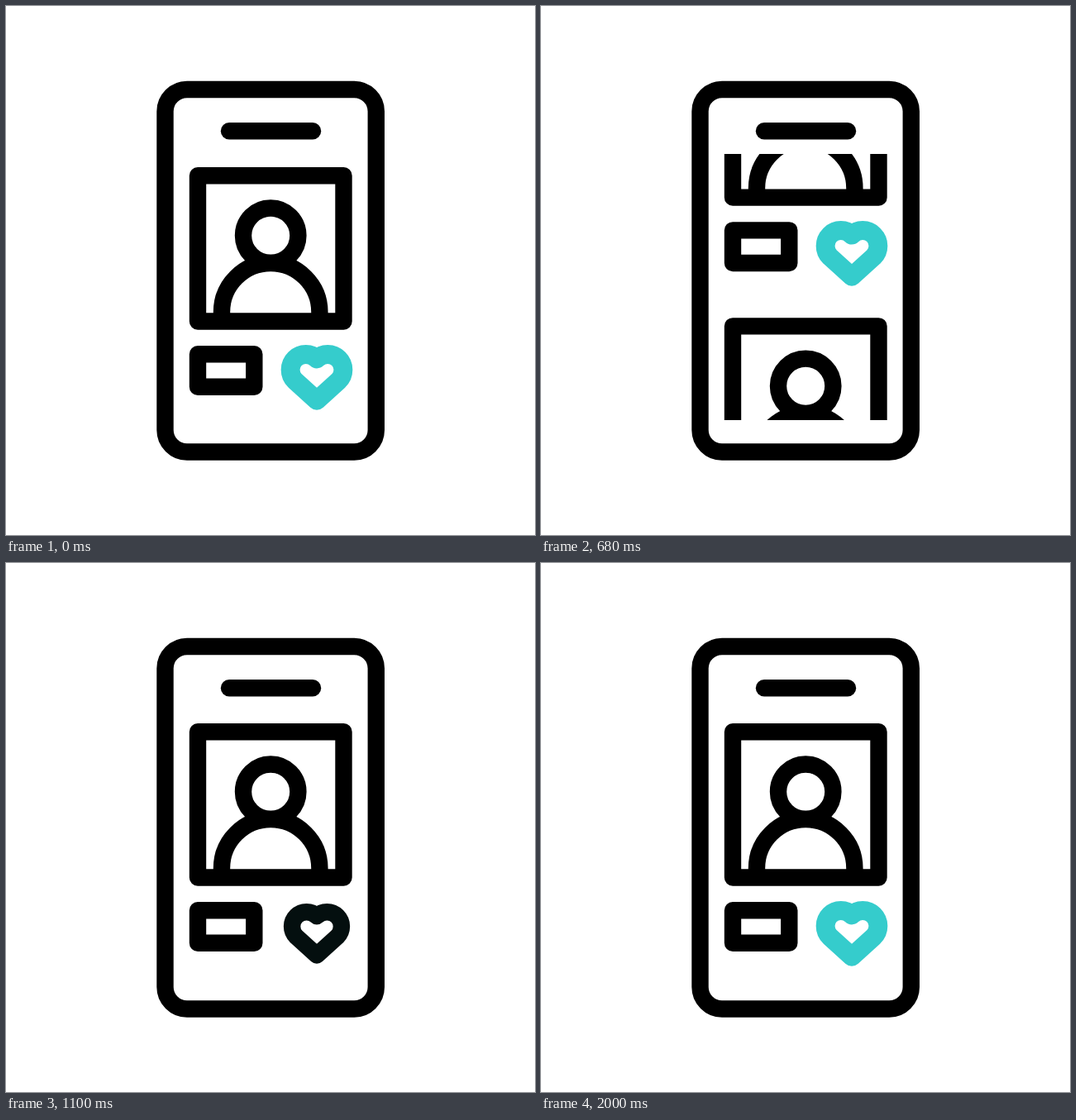
Recreate the animation shown at these times as an HTML page. Size 640x640 px, loop 2.22 s.

```html
<!DOCTYPE html>
<html lang="en">
<head>
<meta charset="utf-8">
<title>Profile feed</title>
<style>
html, body { margin: 0; height: 100%; overflow: hidden; background: #fff; }
svg { display: block; width: 100%; height: 100%; }
</style>
</head>
<body>
<svg viewBox="0 0 640 640" fill="none" stroke="#000" stroke-width="20.4" stroke-linejoin="round">
  <defs>
    <clipPath id="screen"><rect x="203" y="179" width="235" height="322"/></clipPath>
    <g id="card">
      <rect x="232" y="204.2" width="176.5" height="176.3"/>
      <circle cx="320.2" cy="276.7" r="33.2"/>
      <path d="M261 372V369.2A59.2 59.2 0 0 1 379.4 369.2V372"/>
      <rect x="232" y="420.2" width="68.3" height="39.6"/>
    </g>
    <!-- centred on its own origin -->
    <path id="heart" vector-effect="non-scaling-stroke"
      d="M0 26.5L-24.8 4A17.5 17.5 0 1 1 0 -20.7A17.5 17.5 0 1 1 24.8 4Z"/>
  </defs>
  <rect x="192.5" y="101" width="255.3" height="438.5" rx="26.5"/>
  <path d="M270 151.2H371" stroke-linecap="round"/>
  <g clip-path="url(#screen)">
    <g id="old"><use href="#card"/><path class="heart"/></g>
    <g id="new"><use href="#card"/><path class="heart"/></g>
  </g>
</svg>
<script>
const LOOP = 2220, STEP = 20, SCROLL = 333;
const TEAL = [53, 204, 204];
const BASE = { size: 0.98, width: 20.3 };
const PEAK = { size: 1.252, width: 22.8 };
const REST = { size: 1.066, width: 22.9 };

const cards = ['old', 'new'].map(id => document.getElementById(id));
const hearts = [...document.querySelectorAll('.heart')];
const mix = (a, b, p) => a + (b - a) * p;

// Smooth start and stop between two times
function ease(t, from, to) {
  const s = Math.min(1, Math.max(0, (t - from) / (to - from)));
  return s * s * (3 - 2 * s);
}

function heartPath(k) {
  const n = v => (v * k).toFixed(3);
  const at = (x, y) => `${(376 + x * k).toFixed(3)} ${(448 + y * k).toFixed(3)}`;
  const arc = `A${n(17.5)} ${n(17.5)} 0 1 1 `;
  return `M${at(0, 26.5)}L${at(-24.8, 4)}${arc}${at(0, -20.7)}${arc}${at(24.8, 4)}Z`;
}

function setHeart(el, size, width, tint) {
  el.setAttribute('d', heartPath(size));
  el.setAttribute('stroke-width', width);
  el.setAttribute('stroke', `rgb(${TEAL.map(c => Math.round(c * tint))})`);
}

function draw(now) {
  const t = Math.floor((now % LOOP) / STEP) * STEP;
  const scroll = ease(t, 400, 1000);
  const grow = ease(t, 1000, 1600);
  const settle = ease(t, 1600, 2000);
  const value = key => mix(mix(BASE[key], PEAK[key], grow), REST[key], settle);

  cards[0].setAttribute('transform', `translate(0 ${1 - SCROLL * scroll})`);
  cards[1].setAttribute('transform', `translate(0 ${SCROLL * (1 - scroll)})`);
  setHeart(hearts[0], REST.size, REST.width, 1);
  setHeart(hearts[1], value('size'), value('width'), grow);
}

const start = performance.now();
function tick() {
  draw(performance.now() - start);
  requestAnimationFrame(tick);
}
tick();
</script>
</body>
</html>
```
